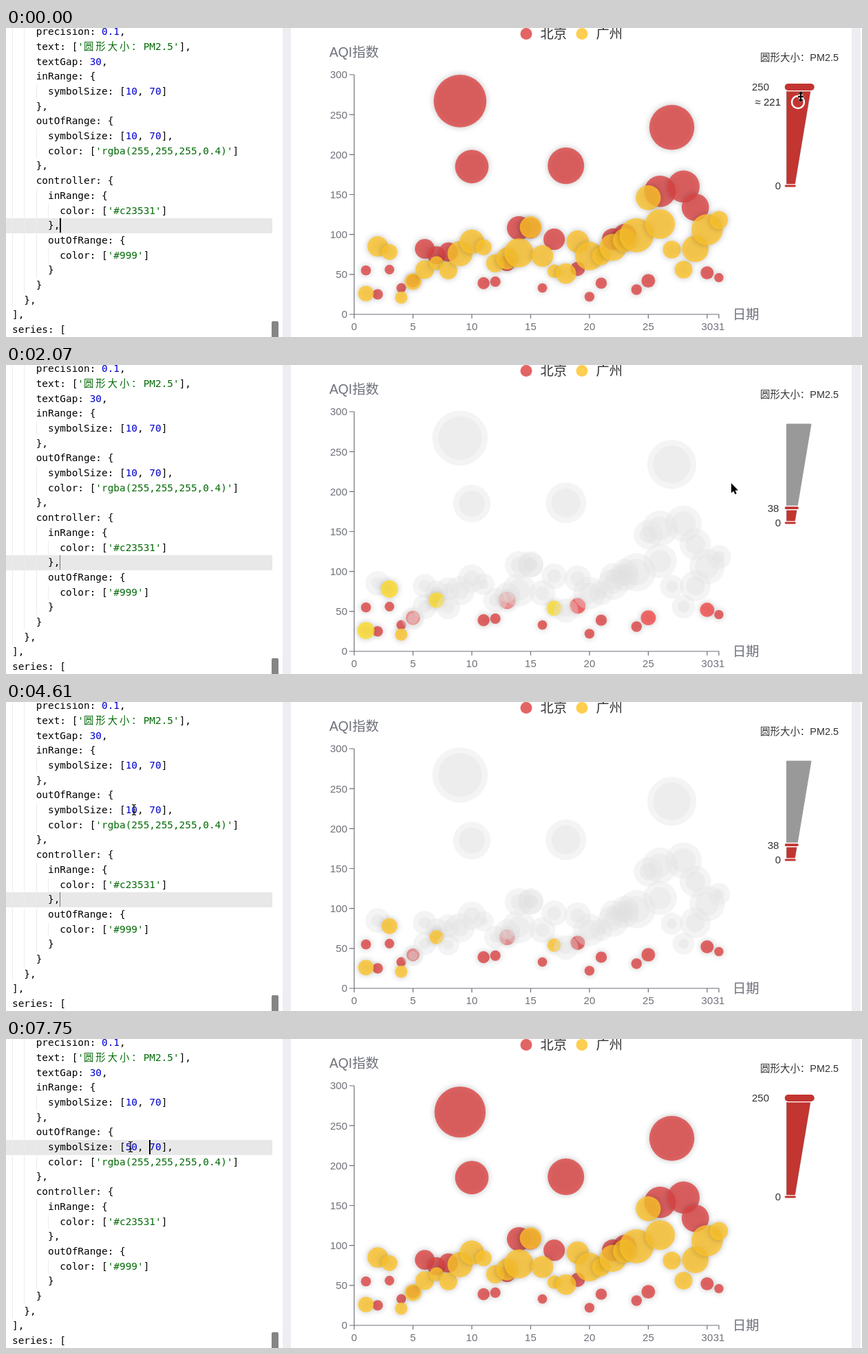
An HTML page with a canvas that plays this animation: 1244x450 px, repeating every 8000 ms.

```html
<!DOCTYPE html>
<html lang="zh-CN">
<head>
<meta charset="utf-8">
<title>AQI bubble chart</title>
<style>
html, body { margin: 0; width: 100%; height: 100%; overflow: hidden; background: #fff; }
body { position: relative; font-family: "Liberation Sans", Arial, "Noto Sans CJK SC", "Noto Sans CJK", sans-serif; }
canvas, svg { position: absolute; left: 0; top: 0; }
#code { position: absolute; left: 0; top: 0; width: 387px; height: 450px; overflow: hidden;
  font: 14.4px/21.7px "DejaVu Sans Mono", "Noto Sans CJK SC", "Noto Sans CJK", monospace; color: #000; }
.line { position: absolute; left: 0; width: 378px; height: 21.7px; padding-left: 9px; white-space: pre; }
.line.on { background: #e8e8e8; }
.pad { display: inline-block; height: 21.7px; vertical-align: top;
  background: repeating-linear-gradient(90deg, #ececec 0 1px, transparent 1px 17.34px); }
.num { color: #0000cd; }
.str { color: #036a07; }
.wide { letter-spacing: 2.94px; }
#caret { position: absolute; width: 2px; height: 21px; background: #000; }
.strip { position: absolute; top: 0; height: 450px; background: #eeeef2; }
#thumb { position: absolute; left: 386px; top: 427px; width: 10px; height: 23px; background: #858585; border-radius: 2px 2px 0 0; }
#tip { position: absolute; left: 0; top: 0; box-sizing: border-box; padding: 11px 14px 14px; border-radius: 5px;
  background: #fff; box-shadow: 1px 2px 10px rgba(0,0,0,.22); color: #666; white-space: nowrap;
  font-size: 16.9px; line-height: 25.3px; }
#tip b { display: block; font-weight: 400; font-size: 21.7px; line-height: 30px; margin-bottom: 14.8px; }
</style>
</head>
<body>
<div id="code"></div>
<div id="thumb"></div>
<div class="strip" style="left:402px;width:12px"></div>
<div class="strip" style="left:1229px;width:13px"></div>
<canvas id="plot" width="1244" height="450"></canvas>
<svg id="chart" width="1244" height="450"></svg>
<div id="tip"></div>
<svg id="top" width="1244" height="450"></svg>
<script>
const $ = id => document.getElementById(id);
const LOOP = 8000, TICK = 148.5;

// Per day: AQI, PM2.5
const beijing = [55,9, 25,11, 56,7, 33,7, 42,24, 82,58, 74,49, 78,55, 267,216, 185,127, 39,19,
  41,11, 64,38, 108,79, 108,63, 33,6, 94,66, 186,142, 57,31, 22,8, 39,15, 94,69, 99,73, 31,12,
  42,27, 154,117, 234,185, 160,120, 134,96, 52,24, 46,5];
const guangzhou = [26,37, 85,62, 78,38, 21,21, 41,42, 56,52, 64,30, 55,48, 76,85, 91,81, 84,39,
  64,51, 70,69, 77,105, 109,68, 73,68, 54,27, 51,61, 91,71, 73,102, 73,50, 84,94, 93,77, 99,130,
  146,84, 113,108, 81,48, 56,48, 82,92, 106,116, 118,50];
const RED = '#dd4444', GOLD = '#fec42c';
const series = [
  { data: beijing, color: RED, lift: '#f24a4a' },
  { data: guangzhou, color: GOLD, lift: '#fedc2c' },
];

// Tables of [tick, values...]
const rangeKeys = [[0,250],[5,250],[7,202],[12,52],[13,38],[48,38],[49,250]];
const hoverKeys = [[0,.3],[1,1],[14,1],[15,0]];
const mouseKeys = [[0,1155,100],[5,1155,100],[7,1153,127],[12,1151,214],[13,1150,222],[14,1054,172],
  [18,690,115],[19,655,110],[20,657,112],[21,740,170],[22,860,240],[23,945,283],[24,730,222],
  [25,450,180],[26,290,160],[27,140,142],[28,187,148],[29,188,149],[31,186,157],[34,183,157],[35,181,157]];
const tipKeys = [[17,960,230,0],[18,925,205,.25],[19,848,147,.65],[20,748,110,1],[21,705,97,1],
  [22,705,97,1],[23,735,85,1],[24,782,73,1],[25,800,64,.5],[26,805,62,0]];

function sample(keys, k) {
  let i = 0;
  while (i < keys.length - 1 && keys[i + 1][0] <= k) i++;
  const a = keys[i], b = keys[i + 1];
  if (!b || k <= a[0]) return a.slice(1);
  const u = (k - a[0]) / (b[0] - a[0]);
  return a.slice(1).map((v, j) => v + (b[j + 1] - v) * u);
}
const rangeAt = k => sample(rangeKeys, k)[0];

function el(parent, tag, attrs, text) {
  const e = document.createElementNS('http://www.w3.org/2000/svg', tag);
  set(e, attrs);
  if (text != null) e.textContent = text;
  return parent.appendChild(e);
}
function set(e, attrs) {
  for (const n in attrs) e.setAttribute(n, attrs[n]);
}
function label(x, cy, text, size, fill, anchor = 'start') {
  return el($('chart'), 'text', { x, y: cy + size * .36, 'font-size': size, fill, 'text-anchor': anchor }, text);
}

// Code editor: [indent, text]
const source = [[4,"precision: 0.1,"],[4,"text: ['圆形大小：PM2.5'],"],[4,"textGap: 30,"],[4,"inRange: {"],
  [6,"symbolSize: [10, 70]"],[4,"},"],[4,"outOfRange: {"],[6,"symbolSize: [10, 70],"],
  [6,"color: ['rgba(255,255,255,0.4)']"],[4,"},"],[4,"controller: {"],[6,"inRange: {"],
  [8,"color: ['#c23531']"],[6,"},"],[6,"outOfRange: {"],[8,"color: ['#999']"],[6,"}"],[4,"}"],
  [2,"},"],[0,"],"],[0,"series: ["]];
const CH = 8.67, lineTop = i => 21.7 * i - 4.85;

function paint([indent, text]) {
  const body = text.replace(/'[^']*'|\b\d+(\.\d+)?\b/g, m => m[0] === "'"
    ? `<span class="str">${m.replace(/[^\x00-\x7f]+/, '<span class="wide">$&</span>')}</span>`
    : `<span class="num">${m}</span>`);
  return `<span class="pad" style="width:${indent * CH}px"></span>${body}`;
}
const lines = source.map((s, i) => {
  const d = document.createElement('div');
  d.className = 'line';
  d.style.top = lineTop(i) + 'px';
  d.innerHTML = paint(s);
  return $('code').appendChild(d);
});
const caret = document.createElement('div');
caret.id = 'caret';
$('code').appendChild(caret);

function drawCode(k) {
  const row = k < 37 ? 13 : 7;
  lines.forEach((d, i) => d.classList.toggle('on', i === row));
  const size = k < 43 ? '10' : k < 45 ? '0' : '50';
  lines[7].innerHTML = paint([6, `symbolSize: [${size}, 70],`]);
  const col = k < 37 ? 8 : k < 43 ? 20 : k < 45 ? 19 : k < 49 ? 20 : k < 52 ? 22 : 23;
  const faint = (k > 0 && k < 37) || (k > 40 && k < 43);
  caret.style.left = 9 + col * CH - .5 + 'px';
  caret.style.top = lineTop(row) + 'px';
  caret.style.width = faint ? '1px' : '2px';
  caret.style.opacity = faint ? .5 : 1;
}

// Axes and static labels
const px = d => 506 + d * 530 / 31, py = v => 417 - v * 349 / 300;
const AXIS = '#6e7079';
let axis = 'M506 68V417M506 417H1036';
for (let v = 0; v <= 300; v += 50) {
  axis += `M499 ${py(v)}H506`;
  label(496, py(v), v, 15, AXIS, 'end');
}
for (const d of [0, 5, 10, 15, 20, 25, 30, 31]) {
  axis += `M${px(d)} 417v6`;
  label(px(d), 434.5, d, 15, AXIS, 'middle');
}
el($('chart'), 'path', { d: axis, stroke: AXIS, 'stroke-width': 1.2, fill: 'none' });
label(470, 35, 'AQI指数', 19.3, AXIS);
label(1056, 417, '日期', 19.3, AXIS);
[[756, RED, '北京'], [837, GOLD, '广州']].forEach(([x, fill, name]) => {
  el($('chart'), 'circle', { cx: x, cy: 8.5, r: 8.5, fill, opacity: .83 });
  label(x + 20.5, 8.5, name, 19.3, '#333');
});
label(1210, 42.5, '圆形大小：PM2.5', 14.45, '#333', 'end');

// Size legend
const barY = v => 230 - v * .576, barX = v => 1146 + v * .096;
const slab = (lo, hi) => `M1134.5 ${barY(hi)}H${barX(hi)}L${barX(lo)} ${barY(lo)}H1134.5Z`;
el($('chart'), 'path', { d: slab(0, 250), fill: '#999', stroke: '#999', 'stroke-linejoin': 'round' });
const slabOn = el($('chart'), 'path', { fill: '#c23531' });
const grips = [0, 1].map(() => el($('chart'), 'rect', { fill: '#c23531', stroke: '#fff', 'stroke-width': 1.4 }));
const gripText = [0, 1].map(() => label(0, 0, '', 15, '#333', 'end'));
const ring = el($('chart'), 'circle', { stroke: '#fff', 'stroke-width': 2.4 });
const ringText = label(0, 0, '', 15, '#222', 'end');

function drawLegend(k) {
  const top = rangeAt(k);
  const mark = k < 1 ? ['≈ 221', 1151, 108, 1126, '#c23531']
    : k >= 18 && k < 23 ? ['216', 1149.5, 121, 1124, '#999']
    : k >= 23 && k < 26 ? ['108', 1145.5, 177, 1120, '#999'] : null;
  const dim = mark && k > 0;
  set(slabOn, { d: slab(0, top) });
  [0, top].forEach((v, i) => {
    const h = 4.2 + v * .028, y = barY(v);
    set(grips[i], { x: 1131, y: y - h / 2, width: barX(v) + 2.5 + v * .012 - 1131, height: h, rx: h / 2 });
    set(gripText[i], { x: 1126 - v * .068, y: y + 5.4, fill: dim ? '#e8e8e8' : '#333' });
    gripText[i].textContent = Math.round(v);
  });
  ring.style.display = ringText.style.display = mark ? '' : 'none';
  if (!mark) return;
  const [text, cx, cy, x, fill] = mark;
  set(ring, { cx, cy, r: 9, fill });
  set(ringText, { x, y: cy + 5.4 });
  ringText.textContent = text;
}

// Bubbles
const ctx = $('plot').getContext('2d');
function disc(x, y, r, fill, alpha) {
  if (r <= 0) return;
  ctx.globalAlpha = alpha;
  ctx.fillStyle = fill;
  ctx.beginPath();
  ctx.arc(x, y, r, 0, 7);
  ctx.fill();
}
function drawBubbles(k) {
  const top = rangeAt(k), before = rangeAt(Math.max(0, k - 1));
  const near = k < 6 ? 221 : top, hover = sample(hoverKeys, k)[0];
  ctx.clearRect(0, 0, 1244, 450);
  for (const { data, color, lift } of series) {
    for (let i = 0; i < 31; i++) {
      const x = px(i + 1), y = py(data[2 * i]), pm = data[2 * i + 1];
      const lit = Math.abs(pm - near) <= 15 ? hover : 0;
      const r = .602 * (10 + pm * .24) * (1 + .1 * lit);
      // A colour change takes one tick
      const out = ((pm > top) + (pm > before)) / 2;
      if (out < 1) {
        ctx.shadowBlur = 10;
        ctx.shadowColor = 'rgba(0,0,0,.3)';
        disc(x, y, r, lit > .5 ? lift : color, .8 * (1 - out));
        ctx.shadowColor = 'transparent';
      }
      if (out > 0) {
        disc(x, y, r + 3, '#e0e0e0', .36 * out);
        disc(x, y, r - 5.5, '#e0e0e0', .35 * out);
      }
    }
  }
}

// Tooltip
const fields = ['AQI指数', 'PM2.5', 'PM10', '一氧化碳（CO）', '二氧化氮（NO2）', '二氧化硫（SO2）'];
const card = (title, values) => `<b>${title}</b>` + fields.map((f, i) => `${f}：${values[i]}`).join('<br>');
const cards = [
  card('北京 9日：重度污染', [267, 216, 280, 4.8, 108, 64]),
  card('广州 26日：轻度污染', [113, 108, 137, 1.481, 48, 15]),
];
function drawTip(k) {
  const [x, y, opacity] = sample(tipKeys, k), s = $('tip').style;
  s.transform = `translate(${x}px,${y}px)`;
  s.opacity = opacity;
  $('tip').innerHTML = cards[k < 23 ? 0 : 1];
}

// Mouse pointer
const solid = { fill: '#000', stroke: '#fff', 'stroke-width': 1, 'paint-order': 'stroke' };
const pointers = {
  arrow: ['M0 0V14.5L3.3 11.4 5.5 16.2 7.8 15.2 5.6 10.6H10Z', solid],
  resize: ['M0-8L4-4H1V-1H4V1H1V4H4L0 8-4 4H-1V1H-4V-1H-1V-4H-4Z', solid],
  hand: ['M-4 1V-6.5q1.5-2.2 3 0V-2l6.5 1.3q2 .5 2 2.5v2.2L6 8h-7.5L-7 2q.3-2 3-.2M2-1V1.5M4.5-.5V2',
    { fill: '#fff', stroke: '#000', 'stroke-width': 1.2, 'stroke-linejoin': 'round' }],
  beam: ['M-3-7.5Q0-7.5 0-6Q0-7.5 3-7.5M0-6V6M-3 7.5Q0 7.5 0 6Q0 7.5 3 7.5M-2 3H2',
    { fill: 'none', stroke: '#000', 'stroke-width': 1.2 }],
};
for (const n in pointers) pointers[n] = el($('top'), 'path', { d: pointers[n][0], ...pointers[n][1] });

function drawMouse(k) {
  const kind = k < 14 ? 'resize' : [18, 19, 20, 23].includes(k) ? 'hand' : k < 26 ? 'arrow' : 'beam';
  const [x, y] = sample(mouseKeys, k);
  for (const n in pointers) pointers[n].style.display = n === kind ? '' : 'none';
  set(pointers[kind], { transform: `translate(${x} ${y})` });
}

let shown = -1;
const start = performance.now();
function frame() {
  const t = (performance.now() - start) % LOOP;
  const k = Math.min(53, Math.floor((t + 20) / TICK));
  if (k !== shown) {
    shown = k;
    [drawCode, drawBubbles, drawLegend, drawTip, drawMouse].forEach(draw => draw(k));
  }
  requestAnimationFrame(frame);
}
frame();
</script>
</body>
</html>
```
